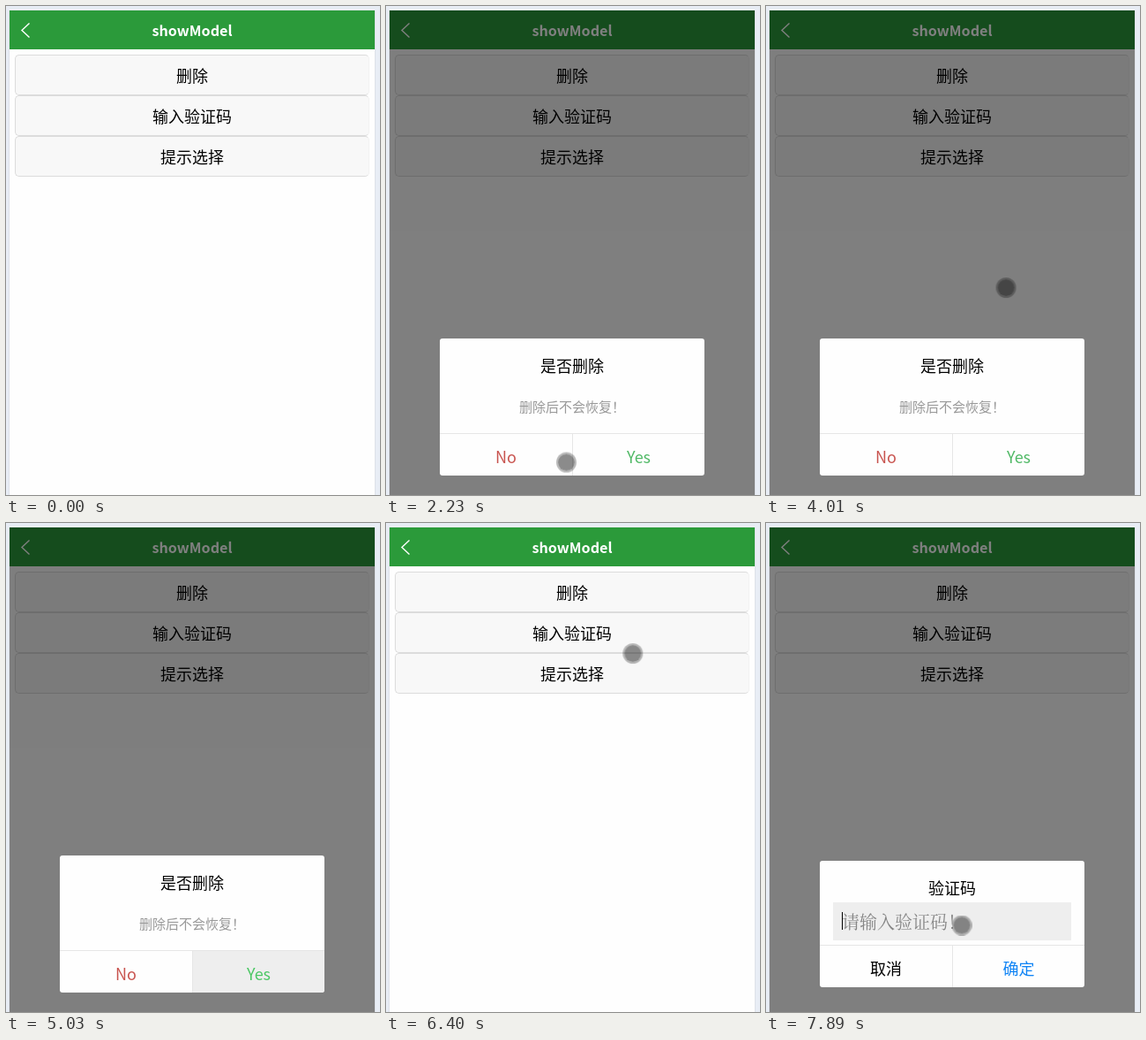
An HTML page that plays this animation: 424 by 553 pixels, repeating every 8000 ms.

```html
<!DOCTYPE html>
<html lang="zh-CN">
<head>
<meta charset="utf-8">
<title>showModel</title>
<style>
html, body { margin: 0; width: 100%; height: 100%; overflow: hidden; background: #e8edf5; }
body { position: relative; font: 18px/46px "Noto Sans CJK SC", "Noto Sans CJK", sans-serif; color: #000; text-align: center; }
div { position: absolute; box-sizing: border-box; white-space: nowrap; }

.page { left: 0; top: 0; width: 424px; height: 553px; clip-path: inset(5px 6px 0 4px); }
.screen { inset: 5px 6px 0 4px; background: #fefefe; }
.edge { left: 3px; top: 5px; width: 416px; height: 560px; border: 1px solid #dde1e8; border-top: 0; }
.bar { left: 4px; top: 5px; width: 414px; height: 44px; background: #2b9a3a; color: #fff; font-weight: 700; font-size: 16.2px; line-height: 44px; }
.bar svg { position: absolute; left: 11px; top: 12px; }
.btn { left: 10px; width: 402px; height: 46px; line-height: 46px; background: #f8f8f8; border-radius: 5px; }
.btn::after { content: ""; position: absolute; inset: 0; border: 1px solid #dcdcdc; border-right-color: #f2f2f2; border-radius: 5px; }

.modal { inset: 0; background: rgba(0, 0, 0, .5); opacity: 0; }
.box { left: 61px; width: 300px; background: #fefefe; border-radius: 3px; overflow: hidden; }
.confirm .box { top: 376px; height: 155px; }
.prompt .box { top: 381.5px; height: 143px; }
.title { left: 0; width: 300px; height: 30px; line-height: 30px; top: 15px; }
.note { left: 0; width: 300px; top: 62px; line-height: 30px; font-size: 15px; color: #999; }
.foot { left: 0; bottom: 0; width: 300px; height: 48px; border-top: 1px solid #e6e6e6; line-height: 50px; }
.foot div { top: 0; width: 150px; height: 48px; }
.foot div + div { left: 150px; border-left: 1px solid #e6e6e6; }
.no { color: #c8534e; }
.yes { color: #50b966; }
.ok { color: #1084f5; }
.field { left: 15px; top: 47.5px; width: 270px; height: 43px; background: #eee; color: #858585; text-align: left; padding-left: 10px; font: 20px/43px "Noto Serif CJK SC", "Noto Serif SC", "AR PL UMing CN", "Noto Sans CJK SC", serif; }
.caret { left: 10px; top: 11px; width: 1px; height: 20px; background: #000; opacity: 0; }

.cursor { left: -11.5px; top: -11.5px; width: 23px; height: 23px; }
.dot { inset: 0; border-radius: 50%; border: 2.5px solid rgba(0, 0, 0, .27); background: rgba(0, 0, 0, .45); background-clip: padding-box; }

/* One loop is 8 s, so 1% is 80 ms */
.confirm { animation: confirm 8s infinite; }
.prompt { animation: prompt 8s infinite; }
.b1 { animation: tap1 8s step-end infinite; }
.b2 { animation: tap2 8s step-end infinite; }
.no { animation: tapNo 8s step-end infinite; }
.yes { animation: tapYes 8s step-end infinite; }
.caret { animation: caret 8s step-end infinite; }
.cursor { animation: move 8s linear infinite, show 8s step-end infinite; }
.dot { animation: press 8s step-end infinite; }

@keyframes confirm {
  0%, 11.3% { opacity: 0; }
  15.1%, 32.6% { opacity: 1; }
  36%, 45.8% { opacity: 0; }
  49.6%, 63.1% { opacity: 1; }
  66.4%, 100% { opacity: 0; }
}
@keyframes prompt {
  0%, 80.2% { opacity: 0; }
  84%, 100% { opacity: 1; }
}
@keyframes tap1 {
  0% { background: #f8f8f8; }
  9.7% { background: #dedede; }
  11.3% { background: #f8f8f8; }
  44.1% { background: #dedede; }
  45.8% { background: #f8f8f8; }
}
@keyframes tap2 {
  0% { background: #f8f8f8; }
  77.9% { background: #dedede; }
  79.6% { background: #f8f8f8; }
}
@keyframes tapNo {
  0% { background: transparent; }
  30.5% { background: #eee; }
  36.2% { background: transparent; }
}
@keyframes tapYes {
  0% { background: transparent; color: #50b966; }
  61.5% { background: #eee; color: #4cc764; }
  66.6% { background: transparent; color: #50b966; }
}
@keyframes caret {
  0% { opacity: 0; }
  93.4% { opacity: 1; }
}
@keyframes show {
  0% { opacity: 0; }
  .8% { opacity: 1; }
  62.7% { opacity: 0; }
  70.5% { opacity: 1; }
}
@keyframes press {
  0% { transform: none; }
  8% { transform: scale(.8); }
  9.6% { transform: none; }
  29.6% { transform: scale(.8); }
  31% { transform: none; }
  43.4% { transform: scale(.8); }
  44.5% { transform: none; }
  59% { transform: scale(.8); }
  60.4% { transform: none; }
  76.5% { transform: scale(.8); }
  77.9% { transform: none; }
  89.3% { transform: scale(.8); }
  90.9% { transform: none; }
}
@keyframes move {
  0%, .8% { transform: translate(290px, 8px); }
  3.5% { transform: translate(307px, 229px); }
  8%, 9.75% { transform: translate(222px, 85px); }
  11.3% { transform: translate(228px, 120px); }
  14% { transform: translate(251.5px, 261.5px); }
  19.1% { transform: translate(258px, 420px); }
  20% { transform: translate(258px, 423px); }
  24% { transform: translate(243px, 475px); }
  27.8% { transform: translate(205.5px, 515.5px); }
  29.6%, 32.2% { transform: translate(174px, 517px); }
  34% { transform: translate(182px, 480px); }
  37% { transform: translate(225px, 280px); }
  39.75% { transform: translate(244px, 119px); }
  40.6% { transform: translate(244px, 67px); }
  41.5%, 44.7% { transform: translate(244.5px, 71.5px); }
  47.5% { transform: translate(255px, 190px); }
  52.75% { transform: translate(288px, 445px); }
  53.5% { transform: translate(288px, 452px); }
  57% { transform: translate(284px, 508px); }
  60.5% { transform: translate(286px, 510px); }
  62%, 62.7% { transform: translate(349px, 529px); }
  62.8%, 70.6% { transform: translate(384px, 545px); }
  71.5% { transform: translate(330px, 370px); }
  72.5% { transform: translate(298px, 240px); }
  75% { transform: translate(285px, 130px); }
  78.25% { transform: translate(282px, 125px); }
  80% { transform: translate(279.5px, 146.5px); }
  83.75% { transform: translate(225px, 330px); }
  86.9%, 93% { transform: translate(204px, 438px); }
  93.5% { transform: translate(208px, 448px); }
  95.25%, 97.7% { transform: translate(211.5px, 454.5px); }
  98.6%, 100% { transform: translate(221.5px, 454.5px); }
}
</style>
</head>
<body>
<div class="edge"></div>
<div class="page">
  <div class="screen"></div>
  <div class="bar">
    <svg width="16" height="20" fill="none" stroke="#fff" stroke-width="1.4"><path d="M11.5 2.5 3 10.5l8.500 8"/></svg>
    showModel
  </div>
  <div class="btn b1" style="top:55px">删除</div>
  <div class="btn b2" style="top:101px">输入验证码</div>
  <div class="btn" style="top:147px">提示选择</div>

  <div class="modal confirm">
    <div class="box">
      <div class="title">是否删除</div>
      <div class="note">删除后不会恢复！</div>
      <div class="foot"><div class="no">No</div><div class="yes">Yes</div></div>
    </div>
  </div>

  <div class="modal prompt">
    <div class="box">
      <div class="title">验证码</div>
      <div class="field">请输入验证码！<div class="caret"></div></div>
      <div class="foot"><div>取消</div><div class="ok">确定</div></div>
    </div>
  </div>

  <div class="cursor"><div class="dot"></div></div>
</div>
</body>
</html>
```
